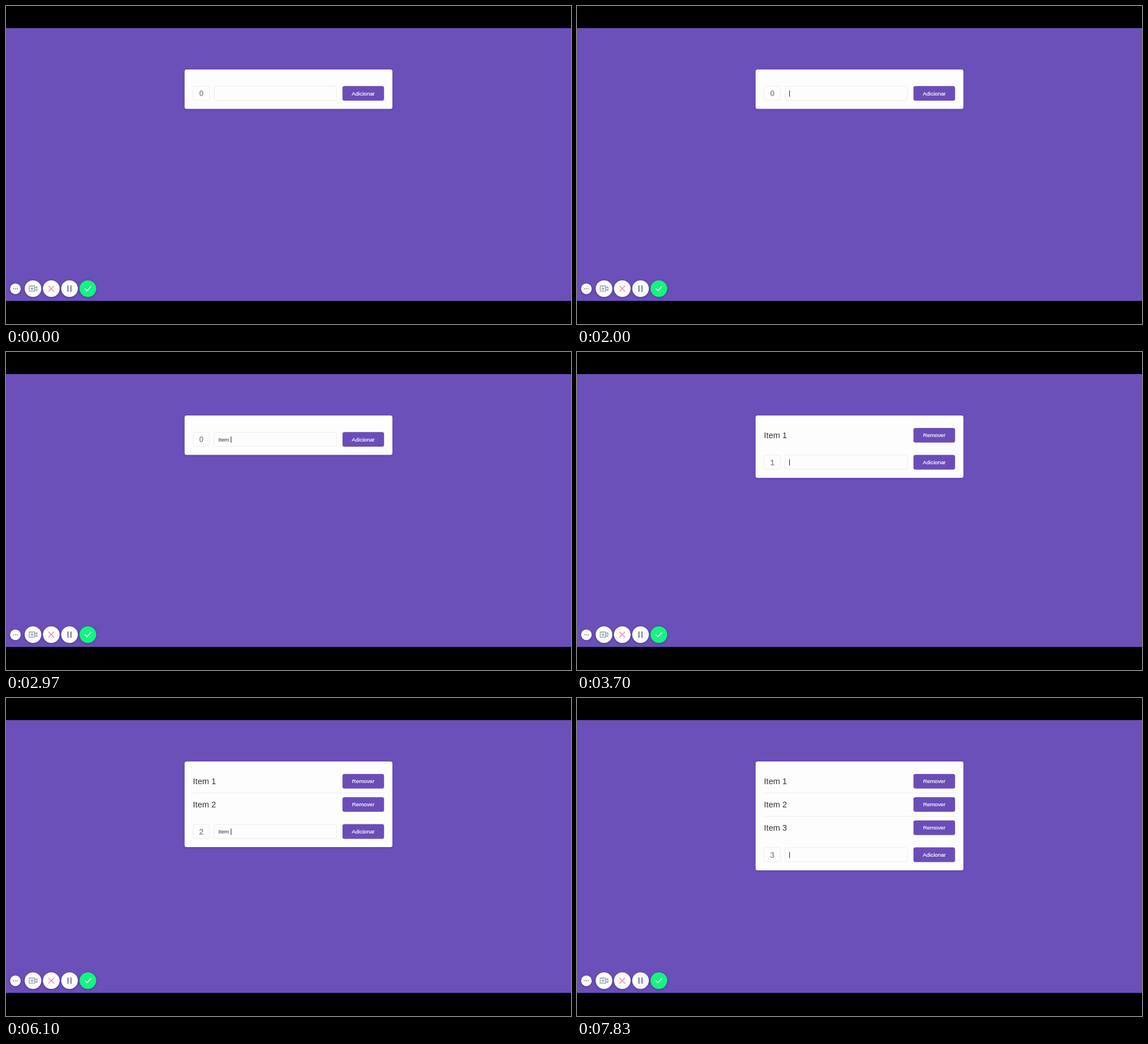
An HTML page that plays this animation: 998 by 561 pixels, repeating every 8 s.

```html
<!DOCTYPE html>
<html lang="pt">
<head>
<meta charset="utf-8">
<style>
html, body { margin: 0; width: 100%; height: 100%; overflow: hidden; background: #000; }
svg { display: block; width: 100%; height: 100%; font-family: "Liberation Sans", Arial, sans-serif; }
.card { fill: #fdfdfd; filter: drop-shadow(0 1px 2px rgba(40, 20, 90, .22)); }
.box { fill: #fdfdfd; stroke: #ececef; }
.btn { fill: #6b4db8; }
.label { fill: #fff; stroke: #fff; stroke-width: .2; font-size: 9.75px; text-anchor: middle; }
.item { fill: #333; font-size: 14.6px; }
.count { fill: #999; font-size: 14.6px; font-weight: bold; text-anchor: middle; }
.typed { fill: #333; font-size: 9.75px; white-space: pre; }
.tool { filter: drop-shadow(0 1px 2px rgba(30, 15, 80, .4)); }
.line { fill: none; stroke-width: 1.3; stroke-linecap: round; stroke-linejoin: round; }
</style>
</head>
<body>
<svg viewBox="0 0 998 561" preserveAspectRatio="none">
  <rect width="998" height="561"/>
  <rect y="39" width="998" height="481.3" fill="#6c50b9"/>
  <rect id="card" class="card" x="315.5" y="112" width="367" rx="3.5"/>
  <g id="rows"></g>
  <g id="form">
    <rect class="box" x="330.5" y="141.5" width="29" height="25" rx="3"/>
    <text id="count" class="count" x="345" y="159.2"></text>
    <rect class="box" x="367.5" y="141.5" width="216" height="25" rx="3"/>
    <text id="typed" class="typed" x="375" y="157.5"></text>
    <rect id="caret" y="149" width="1" height="11" fill="#222"/>
    <rect class="btn" x="594.3" y="141.2" width="73.5" height="25.8" rx="3.5"/>
    <text class="label" x="631" y="157.5">Adicionar</text>
  </g>
  <g class="tool" fill="#fdfdfd">
    <circle cx="16.6" cy="498.8" r="9.4"/>
    <circle cx="47.7" cy="498.6" r="14.7"/>
    <circle cx="80" cy="498.6" r="14.7"/>
    <circle cx="112.2" cy="498.6" r="14.7"/>
    <circle cx="144.6" cy="498.6" r="14.7" fill="#12f680"/>
  </g>
  <g fill="#7d8799">
    <circle cx="13.4" cy="498.8" r="1"/>
    <circle cx="16.6" cy="498.8" r="1"/>
    <circle cx="19.8" cy="498.8" r="1"/>
    <rect x="108.3" y="493" width="2.3" height="11.2" rx=".5"/>
    <rect x="113.6" y="493" width="2.3" height="11.2" rx=".5"/>
  </g>
  <path class="line" stroke="#8b99ad" d="M41 494h9.6v9.2H41zM50.6 497.6l4-2.6v7.2l-4-2.6M43.6 498.6h4.6M45.9 496.3v4.6"/>
  <path class="line" stroke="#ef8fa3" style="stroke-width:1.6" d="M75.4 494l9.2 9.2M84.6 494l-9.2 9.2"/>
  <path class="line" stroke="#fff" style="stroke-width:1.8" d="M139.7 499l3.3 3.3 6.6-7.2"/>
</svg>
<script>
const LOOP = 8000, BLINK = 530, FOCUS = 940, ROW = 41;
const WORD = "Item ";

// Per item: key times of the word, of its digit, and of Enter.
const entries = [
  { start: 2430, step: 120, digit: 3270, enter: 3630 },
  { start: 3960, step: 60, digit: 4500, enter: 4960 },
  { start: 5870, step: 55, digit: 6470, enter: 6710 }
];

const $ = id => document.getElementById(id);

const rowMarkup = i => {
  const y = ROW * i;
  const rule = i ? `<path d="M330.5 ${126.5 + y}H668" stroke="#ececef"/>` : "";
  return `<g>${rule}<text class="item" x="330.3" y="${151.8 + y}">Item ${i + 1}</text>
    <rect class="btn" x="594.3" y="${134 + y}" width="73.5" height="25.8" rx="3.5"/>
    <text class="label" x="631" y="${150.3 + y}">Remover</text></g>`;
};
$("rows").innerHTML = entries.map((_, i) => rowMarkup(i)).join("");
const rows = [...$("rows").children];

// Replays every key press up to time t.
function stateAt(t) {
  let count = 0, text = "", lastKey = FOCUS;
  const press = (at, act) => {
    if (t >= at) { act(); lastKey = at; }
  };
  entries.forEach((e, i) => {
    [...WORD].forEach((ch, k) => press(e.start + k * e.step, () => text += ch));
    press(e.digit, () => text += i + 1);
    press(e.enter, () => { text = ""; count++; });
  });
  const caret = t >= FOCUS && Math.floor((t - lastKey) / BLINK) % 2 === 0;
  return { count, text, caret };
}

function draw(t) {
  const { count, text, caret } = stateAt(t);
  const shift = count ? ROW * count - 0.6 : 0;
  $("card").setAttribute("height", 69.6 + shift);
  $("form").setAttribute("transform", `translate(0 ${shift})`);
  rows.forEach((row, i) => row.style.display = i < count ? "" : "none");
  $("count").textContent = count;
  $("typed").textContent = text;
  const width = text ? $("typed").getComputedTextLength() : 0;
  $("caret").setAttribute("x", Math.round(375 + width));
  $("caret").style.display = caret ? "" : "none";
}

const began = performance.now();
function tick() {
  draw((performance.now() - began) % LOOP);
  requestAnimationFrame(tick);
}
tick();
</script>
</body>
</html>
```
